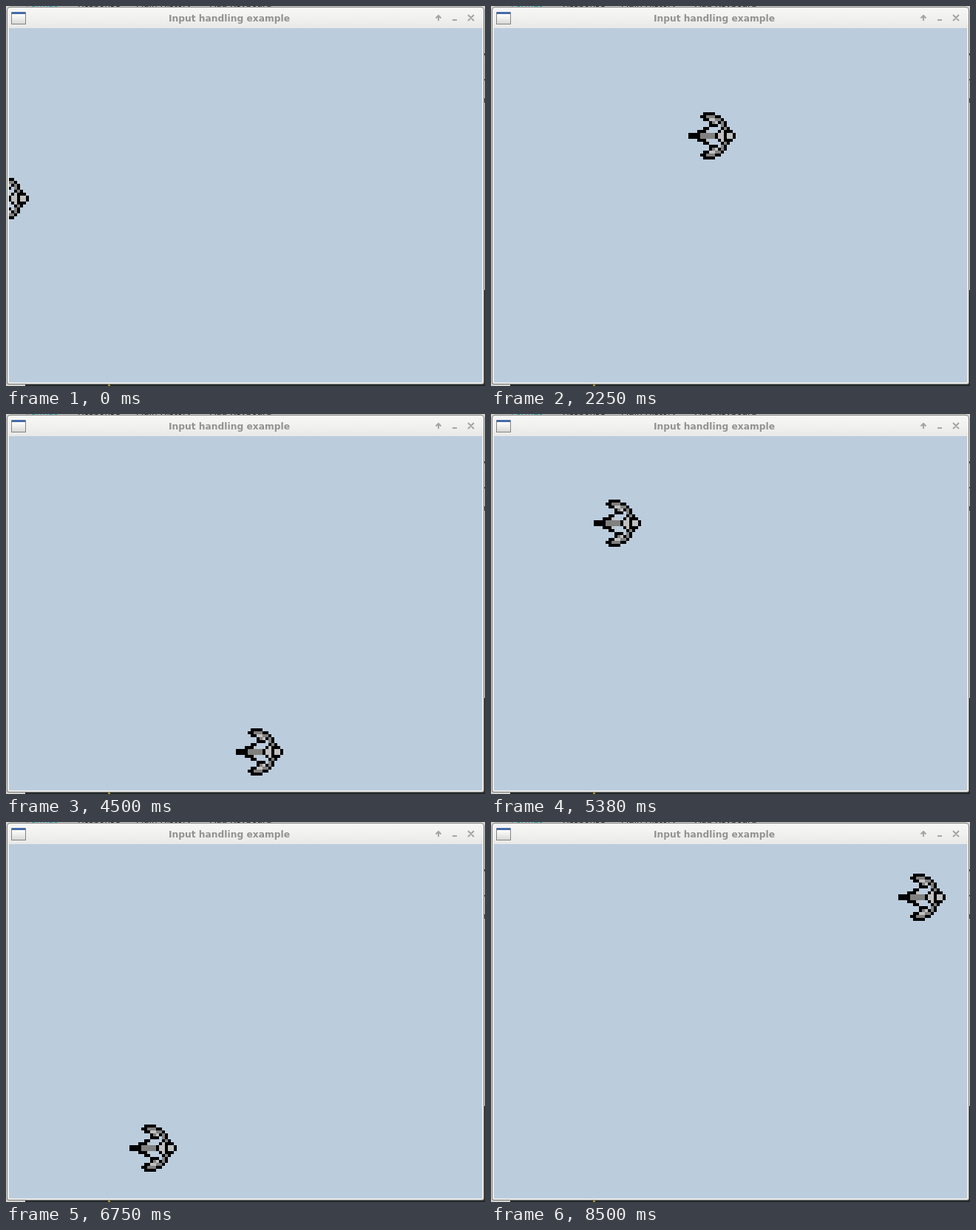
Animation, 648 px wide and 515 px high, one loop 8620 ms. Source, as an HTML page with a canvas:

```html
<!DOCTYPE html>
<html lang="en">
<head>
<meta charset="utf-8">
<title>Input handling example</title>
<style>
html, body { margin: 0; width: 100%; height: 100%; overflow: hidden; }
canvas { display: block; }
</style>
</head>
<body>
<canvas id="stage" width="648" height="515"></canvas>
<script>
const ctx = document.getElementById('stage').getContext('2d');
const LOOP = 8620, STEP = 125;
const CELL = 4, SHIP_CELLS = 16;
const BLACK = '#000', GRAY = '#808080', LIGHT = '#c0c0c0';

const swing = u => (1 - Math.cos(Math.PI * u)) / 2;
const speedUp = u => u ** 1.3;
const slowDown = u => 1 - (1 - u) ** 2.35;

// Turning points of each axis: step, position, easing on the way there.
const ACROSS = [[0, -33], [28.6, 557, speedUp], [40.8, 100], [47, 536],
  [56, 44], [67, 551, slowDown]];
const DOWN = [[0, 229], [4, 134], [12, 285], [18, 134], [25, 269], [28, 200],
  [35, 426], [44.3, 64], [50.1, 446], [64.5, 70]];

function follow(turns, step) {
  const next = turns.findIndex(([at]) => at > step);
  if (next < 0) return turns[turns.length - 1][1];
  const [t0, from] = turns[next - 1];
  const [t1, to, ease = swing] = turns[next];
  return Math.round(from + (to - from) * ease((step - t0) / (t1 - t0)));
}

function rect(color, x, y, w, h) {
  ctx.fillStyle = color;
  ctx.fillRect(x, y, w, h);
}

// Chunky polyline through cells, mirrored to the lower half of the ship.
function trace(pen, color, ...points) {
  pen.fillStyle = color;
  for (let i = 0; i < points.length - 2; i += 2) {
    const [x0, y0, x1, y1] = points.slice(i, i + 4);
    const count = Math.max(Math.abs(x1 - x0), Math.abs(y1 - y0), 1);
    for (let n = 0; n <= count; n++) {
      const col = Math.round(x0 + (x1 - x0) * n / count);
      const row = Math.round(y0 + (y1 - y0) * n / count);
      for (const r of [row, SHIP_CELLS - 1 - row]) {
        pen.fillRect(col * CELL, r * CELL, CELL, CELL);
      }
    }
  }
}

function makeShip() {
  const ship = document.createElement('canvas');
  ship.width = ship.height = SHIP_CELLS * CELL;
  const pen = ship.getContext('2d');
  // Wing
  trace(pen, GRAY, 6, 1, 8, 1, 9, 2, 10, 2, 11, 3, 11, 4, 12, 5);
  trace(pen, GRAY, 8, 3, 8, 3);
  trace(pen, LIGHT, 7, 2, 8, 2, 9, 3);
  trace(pen, BLACK, 4, 1, 5, 0, 8, 0, 9, 1, 10, 1, 12, 3, 12, 4, 15, 7);
  trace(pen, BLACK, 5, 1, 5, 2, 6, 2, 7, 3, 7, 4, 9, 4, 10, 3);
  // Hull and nose
  trace(pen, GRAY, 4, 7, 8, 7);
  trace(pen, LIGHT, 6, 6, 6, 6);
  trace(pen, LIGHT, 11, 6, 11, 7, 10, 7);
  trace(pen, LIGHT, 13, 7, 14, 7);
  trace(pen, BLACK, 0, 7, 3, 7, 3, 6, 5, 6, 5, 5, 6, 5);
  trace(pen, BLACK, 9, 7, 11, 5);
  trace(pen, BLACK, 12, 7, 12, 6, 13, 6);
  return ship;
}

function drawDesktop() {
  rect('#d5d5d2', 0, 0, 648, 515);
  ctx.font = '12px "DejaVu Sans", sans-serif';
  ctx.fillStyle = '#20b8c8';
  ctx.fillText('Format', 27, 1);
  ctx.fillStyle = '#333';
  ctx.fillText('Response', 97, 1);
  ctx.fillText('Main History', 176, 1);
  ctx.fillText('Add Keyboard', 276, 1);
  rect('#24282b', 26, 512, 622, 3);
  rect('#24282b', 646, 385, 2, 130);
  rect('#a89832', 138, 513, 3, 2);
  rect('#555', 647, 64, 1, 3);
  rect('#555', 647, 99, 1, 2);
  rect('#555', 647, 125, 1, 6);
}

function drawButtons() {
  ctx.strokeStyle = '#a5a5a1';
  ctx.lineWidth = 2;
  ctx.stroke(new Path2D(
    'M585 20V13M581.5 16.5L585 13L588.5 16.5M604 19H610M625 12L633 20M633 12L625 20'));
}

function panel(color, inset, radius) {
  ctx.fillStyle = color;
  ctx.beginPath();
  ctx.roundRect(inset, inset, 648 - 2 * inset, 514 - 2 * inset, radius);
  ctx.fill();
}

function fade(y0, y1, top, bottom) {
  const shade = ctx.createLinearGradient(0, y0, 0, y1);
  shade.addColorStop(0, top);
  shade.addColorStop(1, bottom);
  return shade;
}

function drawWindow() {
  panel('#777774', 1, [5, 5, 3, 3]);
  panel(fade(2, 30, '#f8f8f7', '#e9e9e7'), 2, [4, 4, 2, 2]);

  rect('#848480', 7, 8, 20, 17);
  rect(fade(11, 24, '#fff', '#d9d9d7'), 8, 9, 18, 15);
  rect('#446ba8', 8, 8, 18, 3);

  ctx.font = 'bold 12.25px "DejaVu Sans", sans-serif';
  ctx.textAlign = 'center';
  ctx.fillStyle = '#92928e';
  ctx.fillText('Input handling example', 302, 21);
  drawButtons();
}

function draw(time) {
  const step = Math.max(0, Math.floor(time % LOOP / STEP) - 1);
  rect('#bbccdd', 4, 30, 640, 480);
  ctx.drawImage(ship, follow(ACROSS, step), follow(DOWN, step));
}

const ship = makeShip();
drawDesktop();
drawWindow();
ctx.beginPath();
ctx.rect(4, 30, 640, 480);
ctx.clip();

const start = performance.now();
function tick() {
  draw(performance.now() - start);
  requestAnimationFrame(tick);
}
tick();
</script>
</body>
</html>
```
